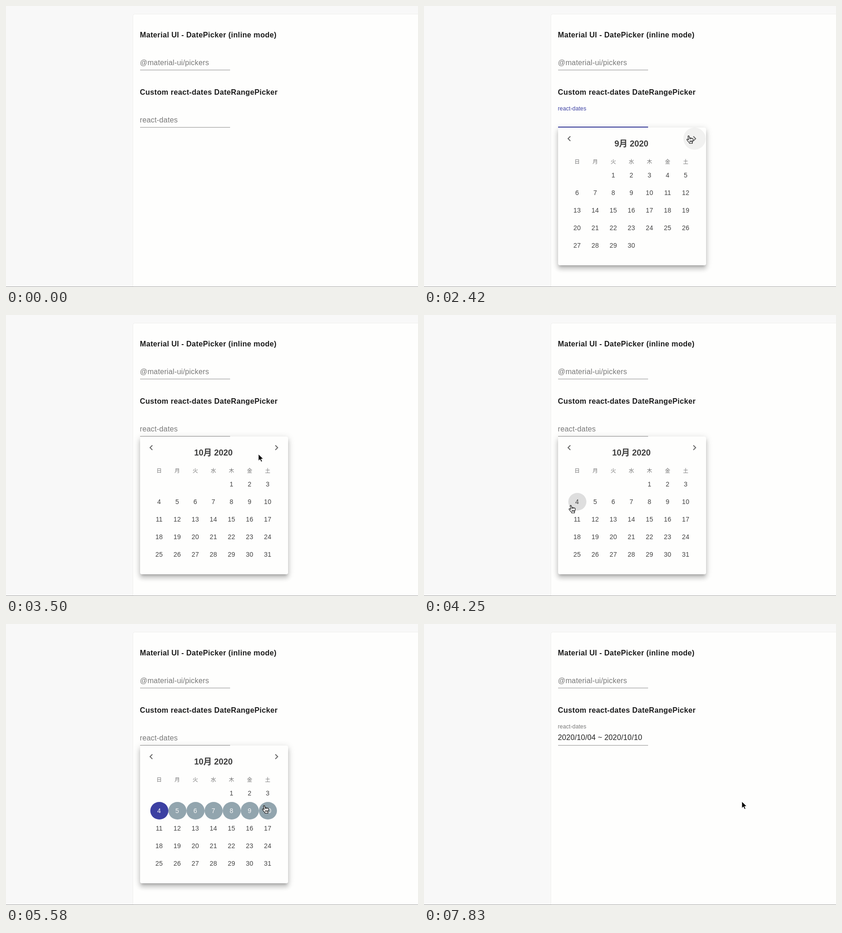
Recreate the animation shown at these times as an HTML page. Size 888 px wide and 608 px high, loop 8000 ms.

```html
<!DOCTYPE html>
<html lang="ja">
<head>
<meta charset="utf-8">
<title>Date range picker</title>
<style>
  html, body { margin: 0; width: 100%; height: 100%; overflow: hidden; background: #f8f8f8; }
  svg { position: absolute; left: 0; top: 0; display: block; }
  text { font-family: "Liberation Sans", Arial, "Noto Sans CJK JP", "Noto Sans CJK", sans-serif; white-space: pre; }
  .heading { font-size: 16px; font-weight: bold; letter-spacing: .34px; fill: #1c1c1c; }
  .field { font-size: 16px; letter-spacing: .15px; fill: #797979; }
  .value { fill: #212121; }
  .title { font-size: 18px; font-weight: bold; fill: #3c3c3c; text-anchor: middle; }
  .weekday { font-size: 11.5px; fill: #757575; text-anchor: middle; }
  .day { font-size: 14px; letter-spacing: .1px; fill: #444; text-anchor: middle; }
  #popup {
    position: absolute; left: 289px; top: 263px; width: 319px; height: 298px;
    border-radius: 4px; overflow: hidden; background: #fefefd;
    box-shadow: 0 5px 5px -3px rgba(0,0,0,.2), 0 8px 10px 1px rgba(0,0,0,.14), 0 3px 14px 2px rgba(0,0,0,.12);
  }
</style>
</head>
<body>
<svg width="888" height="608">
  <rect x="273.5" y="17.5" width="640" height="620" rx="4" fill="#fefefd" stroke="#f0f0ee"/>
  <path d="M0 607.5H888" stroke="#a3a3a3"/>
  <text class="heading" x="288.5" y="68">Material UI - DatePicker (inline mode)</text>
  <text class="field" x="288.5" y="128">@material-ui/pickers</text>
  <path d="M289 138.5H483" stroke="#8f8f8f"/>
  <text class="heading" x="288.5" y="192">Custom react-dates DateRangePicker</text>
  <text class="field" id="label">react-dates</text>
  <text class="field value" id="value" x="288.5" y="251">2020/10/04 ~ 2020/10/10</text>
  <rect id="caret" x="289" y="237" width="1" height="18" fill="#212121"/>
  <rect id="line" x="289" width="194"/>
  <rect id="focusLine" y="261" height="2" fill="#3c40a2"/>
</svg>

<div id="popup">
  <svg id="calendar" width="319" height="298" viewBox="289 263 319 298">
    <g id="months"></g>
    <circle id="buttonHover" cx="583" cy="287" r="24" fill-opacity=".05"/>
    <circle id="ripple" cx="583" cy="287"/>
    <path d="M315.5 282L310.5 287L315.5 292M580.5 282L585.5 287L580.5 292"
          fill="none" stroke="#686868" stroke-width="2"/>
  </svg>
</div>

<svg width="888" height="608">
  <g id="cursor">
    <path id="arrow" d="M0 0V14.5L3.5 11.4L5.8 16.8L8.3 15.7L6 10.5H10.6Z" fill="#000" stroke="#fff"/>
    <g id="hand" transform="translate(-5 -1)" stroke="#000" stroke-width="1.1" stroke-linejoin="round">
      <path fill="#fff" d="M3 2.2C2.8 .6 5 .3 5.5 2L6.6 6.2C7 5 8.8 5 9.2 6.3C9.8 5.4 11.3 5.7 11.6 7C12.5 6.3 14 6.8 14 8.3C14.1 11 13.6 12.5 12.6 14L12.5 17.2H6L5.8 15.4C4.5 14.6 2 11.6 .9 10C-.1 8.5 1.3 7.4 2.6 8.4L4.2 9.8Z"/>
      <path fill="none" d="M7.2 11V14.5M9.2 11V14.5M11.2 11V14.5M6.6 6.2L7 8.6M9.2 6.3L9.4 8.6"/>
    </g>
    <g id="beam" fill="none" stroke-linecap="round">
      <path d="M-3 -7Q0 -7 0 -5Q0 -7 3 -7M0 -5V5M-3 7Q0 7 0 5Q0 7 3 7M-1.5 2H1.5" stroke="#fff" stroke-width="2.6"/>
      <path d="M-3 -7Q0 -7 0 -5Q0 -7 3 -7M0 -5V5M-3 7Q0 7 0 5Q0 7 3 7M-1.5 2H1.5" stroke="#000" stroke-width="1.2"/>
    </g>
  </g>
</svg>

<script>
const LOOP = 8000, COL = 39, ROW = 38, MONTH_PITCH = 299;
const AT = { enter: 920, focus: 1635, blur: 2700, slide: 2802, start: 4600, end: 6000, close: 7550 };
const START_DAY = 4, END_DAY = 10, OCTOBER_OFFSET = 4;
const INDIGO = '#3c40a2', RANGE = '#6c6cae', PREVIEW = '#92a5ae', HOVER = '#dedede';

// Resting points of the pointer: time, x, y
const path = [
  [920, 560, 612], [1500, 338, 237], [1850, 338, 237], [2500, 581, 283],
  [3300, 581, 283], [4150, 317, 412], [4750, 317, 412], [5450, 557, 393],
  [6800, 557, 393], [7400, 685, 384]
];

const $ = id => document.getElementById(id);
const clamp = v => Math.max(0, Math.min(1, v));
const smooth = p => p * p * (3 - 2 * p);
const easeOut = p => 1 - (1 - p) ** 3;
const progress = (t, from, length) => clamp((t - from) / length);
const set = (node, attrs) => { for (const k in attrs) node.setAttribute(k, attrs[k]); };
const show = (node, on) => { node.style.display = on ? '' : 'none'; };

function add(parent, tag, attrs, content = '') {
  const node = document.createElementNS('http://www.w3.org/2000/svg', tag);
  set(node, attrs);
  node.textContent = content;
  return parent.appendChild(node);
}

function buildMonth(title, offset, count, shift) {
  const group = add($('months'), 'g', { transform: `translate(${shift} 0)` });
  add(group, 'text', { class: 'title', x: 447, y: 304 }, title);
  return Array.from({ length: count }, (_, i) => {
    const cell = i + offset;
    const x = 330 + COL * (cell % 7), y = 366 + ROW * Math.floor(cell / 7);
    return {
      disc: add(group, 'ellipse', { cx: x + .5, cy: y, rx: 19.5, ry: 19, fill: 'none' }),
      text: add(group, 'text', { class: 'day', x, y: y + 5 }, i + 1)
    };
  });
}

buildMonth('9月 2020', 2, 30, 0);
const october = buildMonth('10月 2020', OCTOBER_OFFSET, 31, MONTH_PITCH);
[...'日月火水木金土'].forEach((name, i) =>
  add($('calendar'), 'text', { class: 'weekday', x: 330 + COL * i, y: 341 }, name));

function pointerAt(t) {
  const next = path.findIndex(p => p[0] > t);
  if (next < 0) return path[path.length - 1].slice(1);
  if (next === 0) return path[0].slice(1);
  const [t0, x0, y0] = path[next - 1], [t1, x1, y1] = path[next];
  const p = smooth((t - t0) / (t1 - t0));
  return [x0 + (x1 - x0) * p, y0 + (y1 - y0) * p];
}

function hoveredDay(x, y) {
  const col = Math.floor((x - 310.5) / COL), row = Math.floor((y - 347) / ROW);
  const day = row * 7 + col - OCTOBER_OFFSET + 1;
  return col >= 0 && col < 7 && row >= 0 && day >= 1 && day <= 31 ? day : 0;
}

function dayFill(day, hovered, t) {
  if (t >= AT.start && day === START_DAY) return INDIGO;
  if (t >= AT.end) {
    if (day === END_DAY) return INDIGO;
    if (day > START_DAY && day < END_DAY) return RANGE;
  } else if (t >= AT.start && day > START_DAY && day <= hovered) return PREVIEW;
  return day === hovered ? HOVER : 'none';
}

function drawField(t, overInput) {
  const focus = easeOut(progress(t, AT.focus, 200)) * (1 - easeOut(progress(t, AT.blur, 200)));
  const raised = Math.max(focus, easeOut(progress(t, AT.end, 200)));
  const focused = t >= AT.focus && t < AT.blur;
  set($('label'), { transform: `translate(288.5 ${252 - 26 * raised}) scale(${1 - .25 * raised})` });
  $('label').style.fill = focus > .6 ? INDIGO : '';
  show($('value'), t >= AT.end);
  show($('caret'), focused && (t - AT.focus) % 1000 < 500);
  set($('line'), overInput ? { y: 261, height: 2, fill: '#212121' } : { y: 262, height: 1, fill: '#8f8f8f' });
  set($('focusLine'), { x: 386 - 97 * focus, width: 194 * focus });
}

function drawCalendar(t, day, overButton) {
  const slide = smooth(progress(t, AT.slide, 200));
  set($('months'), { transform: `translate(${-MONTH_PITCH * slide} 0)` });
  october.forEach(({ disc, text }, i) => {
    const fill = dayFill(i + 1, day, t);
    set(disc, { fill });
    text.style.fill = fill === 'none' || fill === HOVER ? '' : '#f4f4f4';
  });
  show($('buttonHover'), overButton);
  const growth = smooth(progress(t, AT.blur, 350));
  set($('ripple'), { r: 24 * growth, opacity: .22 * (1 - progress(t, AT.slide, 550)) });
}

function drawCursor(t, x, y, kind) {
  show($('cursor'), t >= AT.enter);
  set($('cursor'), { transform: `translate(${Math.round(x)} ${Math.round(y)})` });
  for (const id of ['arrow', 'hand', 'beam']) show($(id), id === kind);
}

function render() {
  const t = performance.now() % LOOP;
  const [x, y] = pointerAt(t);
  const open = t >= AT.focus && t < AT.close;
  const overInput = t >= AT.enter && x > 289 && x < 483 && y > 228 && y < 263;
  const overButton = open && Math.hypot(x - 583, y - 287) < 24;
  const day = open && t > AT.slide + 200 ? hoveredDay(x, y) : 0;

  show($('popup'), open);
  drawField(t, overInput);
  drawCalendar(t, day, overButton);
  drawCursor(t, x, y, overInput ? 'beam' : overButton || day ? 'hand' : 'arrow');
  requestAnimationFrame(render);
}
render();
</script>
</body>
</html>
```
